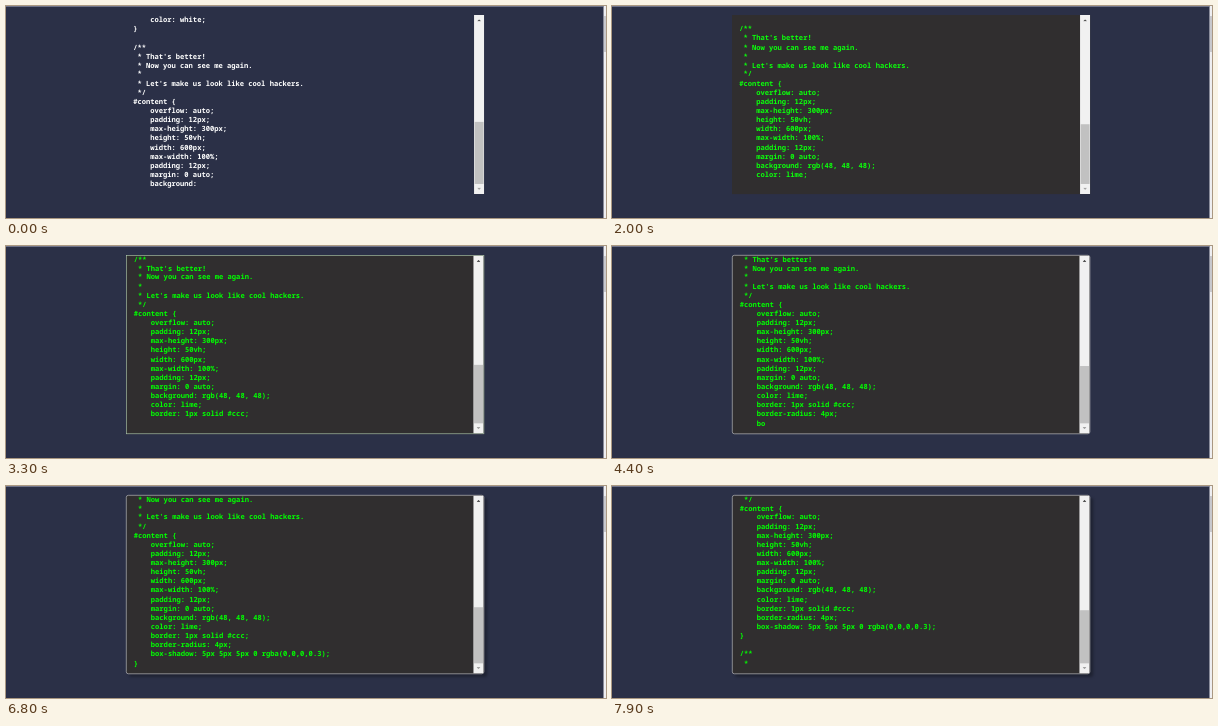
An HTML page for the animation above (8000 ms loop, 600 by 212 pixels).

```html
<!DOCTYPE html>
<html lang="en">
<head>
<meta charset="utf-8">
<title>Typing stylesheet</title>
<style>
  html, body { margin: 0; width: 100%; height: 100%; overflow: hidden; }
  body { position: relative; background: #2b3047; }
  div, pre { position: absolute; box-sizing: border-box; }
  #topline { left: 0; top: 0; width: 100%; height: 1px; background: #70748a; }
  #page-bar { right: 0; top: 0; width: 3px; height: 100%; background: #eeeef1; border-left: 1px solid #8a8c9b; }
  #page-thumb { right: 0; top: 10px; width: 2px; height: 36px; background: #c8c8cc; }
  /* The panel is laid out at full size and shown at the page's reduced scale. */
  #content {
    left: 119.6px; top: 9.2px; width: 600px; height: 300px;
    transform: scale(0.597); transform-origin: 0 0;
    overflow: hidden; border: 0 solid #0f0; color: #fff;
  }
  #code {
    left: 12px; bottom: 9px; margin: 0;
    font: 600 11.92px/15.28px "Noto Sans Mono", "DejaVu Sans Mono", monospace;
    text-rendering: geometricPrecision;
    white-space: pre;
  }
  #bar { right: 0; top: 0; width: 17px; height: 100%; background: #f1f1f1; }
  #thumb { left: 1px; right: 1px; bottom: 17px; background: #c1c1c1; }
  .arrow { left: 5px; width: 7px; height: 4px; }
  .up { top: 7px; background: #505050; clip-path: polygon(0 100%, 50% 0, 100% 100%); }
  .down { bottom: 7px; background: #a3a3a3; clip-path: polygon(0 0, 100% 0, 50% 100%); }
</style>
</head>
<body>
<div id="topline"></div>
<div id="page-bar"></div>
<div id="page-thumb"></div>
<div id="content">
  <pre id="code"></pre>
  <div id="bar">
    <div class="arrow up"></div>
    <div id="thumb"></div>
    <div class="arrow down"></div>
  </div>
</div>
<script>
  const LOOP = 8000, STEP = 100, CHAR = 30, FADE = 500;
  const LINE = 15.28, VIEW = 300, TRACK = 266, FIRST_HEIGHT = 770;

  const intro = `    color: white;
}

/**
 * That's better!
 * Now you can see me again.
 *
 * Let's make us look like cool hackers.
 */
#content {
    overflow: auto;
    padding: 12px;
    max-height: 300px;
    height: 50vh;
    width: 600px;
    max-width: 100%;
    padding: 12px;
    margin: 0 auto;
    background:`;

  // Bursts of typing: start time, text. The gaps are pauses at punctuation.
  const bursts = [
    [-10, " rgb(48,"],
    [400, " 48,"],
    [690, " 48);"],
    [1010, "\n    color:"],
    [1510, " lime;"],
    [1860, "\n    border:"],
    [2390, " 1px solid #ccc;"],
    [3155, "\n    border-radius:"],
    [3895, " 4px;"],
    [4215, "\n    box-shadow:"],
    [4865, " 5px 5px 5px 0 rgba(0,"],
    [5695, "0,"],
    [5925, "0,"],
    [6155, "0."],
    [6385, "3);"],
    [6645, "\n}"],
    [6905, "\n\n"],
    [7510, "/**"],
    [7830, "\n *"]
  ];

  // Style changes: start time, duration, property, from, to
  const changes = [
    [750, FADE, "backgroundColor", "rgba(48,46,47,0)", "rgb(48,46,47)"],
    [1630, FADE, "color", "#fff", "#0f0"],
    [2660, 1, "borderWidth", "0px", "1px"],
    [3000, FADE, "borderColor", "#0f0", "#ccc"],
    [3985, FADE, "borderRadius", "0px", "4px"],
    [6415, FADE, "boxShadow", "5px 5px 5px 0 rgba(0,0,0,0)", "5px 5px 5px 0 rgba(0,0,0,0.3)"]
  ];

  const byId = id => document.getElementById(id);
  const content = byId("content"), code = byId("code"), thumb = byId("thumb");

  const fades = changes.map(([delay, duration, prop, from, to]) => {
    const fade = content.animate({ [prop]: [from, to] }, { delay, duration, fill: "both", easing: "ease" });
    fade.pause();
    return fade;
  });

  const typedAt = time => bursts.reduce((text, [start, part]) => {
    const count = Math.floor((time - start) / CHAR) + 1;
    return text + part.slice(0, Math.max(0, count));
  }, intro);

  const countLines = text => text.replace(/\n$/, "").split("\n").length;
  const firstLines = countLines(intro);

  let shown = -1;
  function draw(time) {
    if (time === shown) return;
    shown = time;
    const text = typedAt(time);
    code.textContent = text;
    const scrollHeight = FIRST_HEIGHT + (countLines(text) - firstLines) * LINE;
    thumb.style.height = TRACK * VIEW / scrollHeight + "px";
    fades.forEach(fade => { fade.currentTime = time; });
  }

  const begin = performance.now();
  function tick() {
    const time = (performance.now() - begin) % LOOP;
    draw(Math.floor(time / STEP) * STEP);
    requestAnimationFrame(tick);
  }
  draw(0);
  requestAnimationFrame(tick);
</script>
</body>
</html>
```
